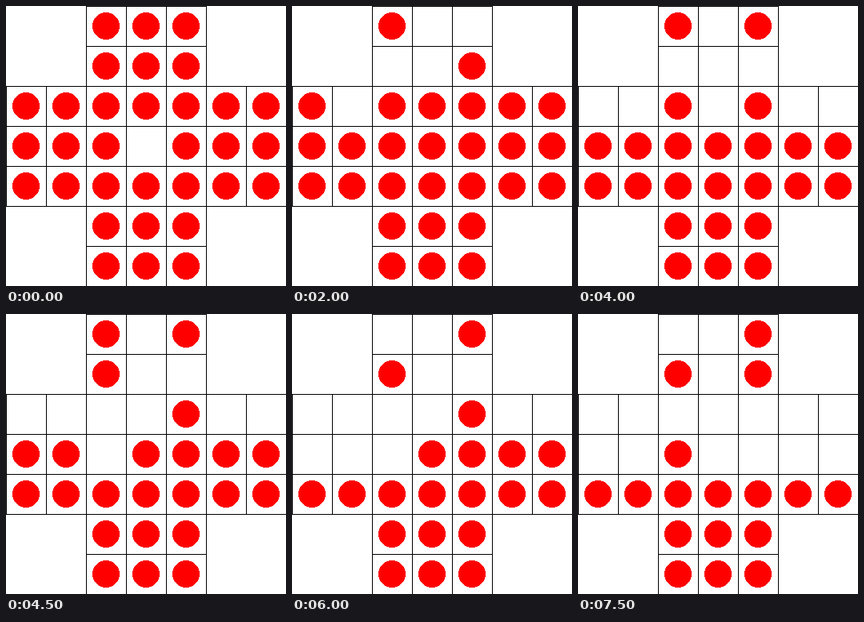
Write an HTML page that moves like this. It is 350x350 px and loops after 8000 ms.

```html
<!DOCTYPE html>
<html lang="en">
<head>
<meta charset="utf-8">
<title>Peg solitaire</title>
<style>
  html, body { margin: 0; width: 100%; height: 100%; overflow: hidden; background: #fff; }
  svg { display: block; }
  rect { fill: none; stroke: #000; }
  circle { fill: #f00; }
</style>
</head>
<body>
<svg id="board" width="350" height="350" shape-rendering="crispEdges"></svg>
<script>
const STEP = 500, LOOP = 8000, CELL = 50;
// Each jump flips three cells in a row: first column, first row, across or down
const jumps = [
  [3, 1, 'down'], [1, 2, 'across'], [2, 0, 'down'], [2, 0, 'across'], [1, 2, 'across'],
  [0, 2, 'across'], [4, 0, 'down'], [4, 2, 'across'], [2, 1, 'down'], [2, 0, 'down'],
  [0, 3, 'across'], [2, 1, 'down'], [2, 3, 'across'], [4, 3, 'across'], [4, 1, 'down']
];
const board = document.getElementById('board');
const pegs = [];

function add(tag, attrs) {
  const el = document.createElementNS('http://www.w3.org/2000/svg', tag);
  for (const name in attrs) el.setAttribute(name, attrs[name]);
  return board.appendChild(el);
}

const inArm = n => n > 1 && n < 5;
for (let row = 0; row < 7; row++) {
  for (let col = 0; col < 7; col++) {
    if (!inArm(row) && !inArm(col)) continue;
    const x = col * CELL, y = row * CELL;
    add('rect', { x: x + .5, y: y + .5, width: CELL, height: CELL });
    pegs[row * 7 + col] = add('circle', { cx: x + 25, cy: y + 25, r: 17 });
  }
}

function draw(count) {
  const filled = pegs.map((_, i) => i !== 24);
  for (const [col, row, dir] of jumps.slice(0, count)) {
    for (let k = 0; k < 3; k++) {
      const i = row * 7 + col + k * (dir === 'down' ? 7 : 1);
      filled[i] = !filled[i];
    }
  }
  pegs.forEach((peg, i) => peg.setAttribute('visibility', filled[i] ? 'visible' : 'hidden'));
}

const start = performance.now();
function tick() {
  draw(Math.floor((performance.now() - start) % LOOP / STEP));
  requestAnimationFrame(tick);
}
tick();
</script>
</body>
</html>
```
